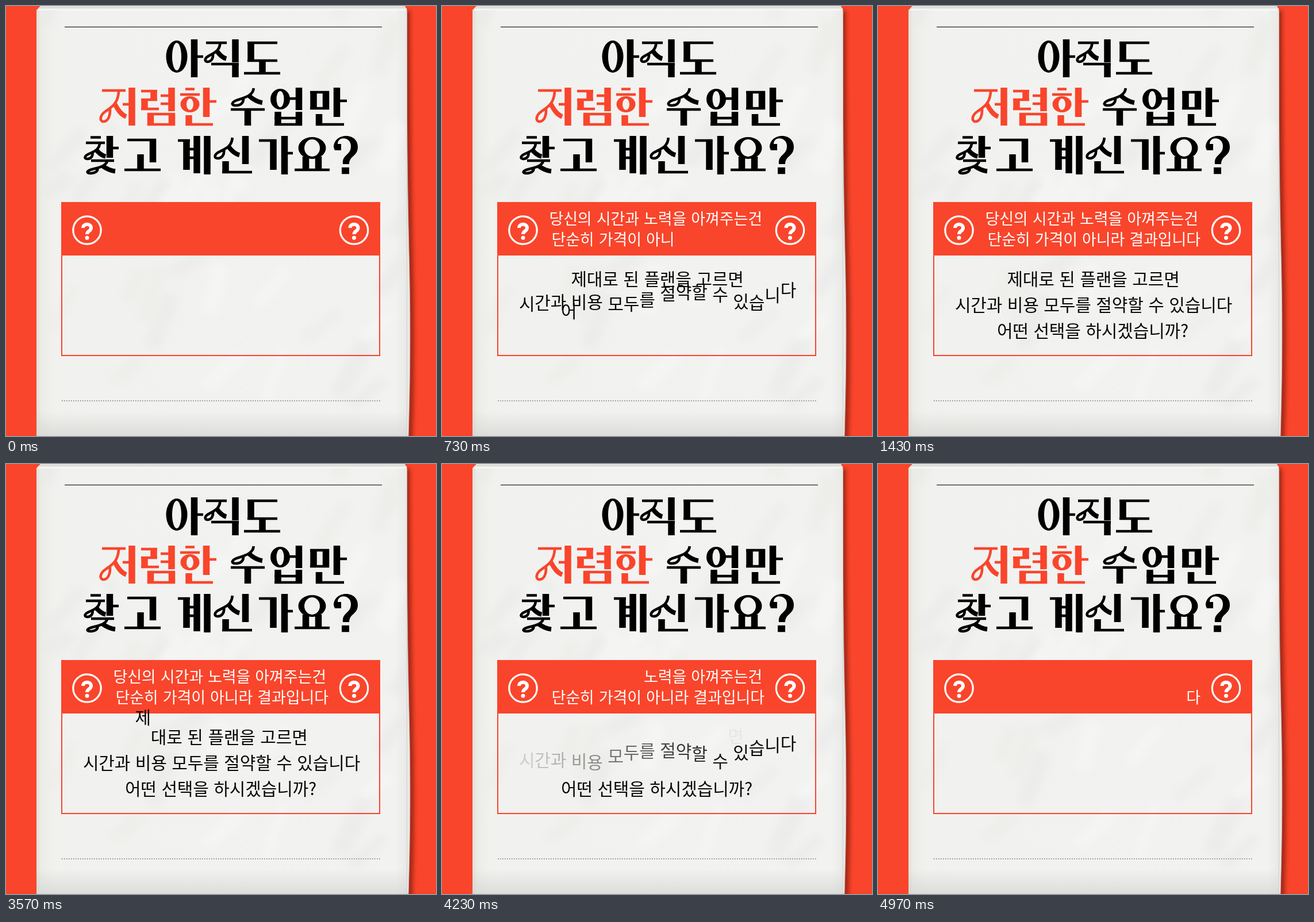
Write an HTML page that moves like this. It is 748 px wide and 748 px high and loops after 5010 ms.

```html
<!DOCTYPE html>
<html lang="ko">
<head>
<meta charset="utf-8">
<style>
html, body { margin: 0; width: 100%; height: 100%; overflow: hidden; background: #f9452b; }
svg { display: block; width: 100vw; height: 100vh; }
text { font-family: "Noto Sans CJK KR", "Noto Sans CJK", "Noto Sans CJK JP", sans-serif; text-anchor: middle; }
.head { font-size: 27px; font-weight: 350; fill: #fff; }
.body { font-size: 30px; font-weight: 500; fill: #080808; }
.thin { fill: none; stroke-width: 4.6; }
.thick { fill: none; stroke-width: 11.5; }
</style>
</head>
<body>
<svg id="stage" viewBox="0 0 748 748">
  <defs>
    <linearGradient id="sheet">
      <stop offset="0" stop-color="#dfdfd8"/>
      <stop offset=".012" stop-color="#ecece7"/>
      <stop offset=".05" stop-color="#f1f1ef"/>
      <stop offset=".97" stop-color="#f2f2f1"/>
      <stop offset="1" stop-color="#e9e9e7"/>
    </linearGradient>
    <linearGradient id="foot" x2="0" y2="1">
      <stop offset="0" stop-color="#cfcfcc" stop-opacity="0"/>
      <stop offset="1" stop-color="#cfcfcc" stop-opacity=".6"/>
    </linearGradient>
    <filter id="soft" x="-50%" y="-50%" width="200%" height="200%"><feGaussianBlur stdDeviation="7"/></filter>
    <filter id="blur" x="-200%" width="500%"><feGaussianBlur stdDeviation="3.5"/></filter>
    <clipPath id="page"><path d="M53 7H697V748H53Z"/></clipPath>
  </defs>
  <rect width="748" height="748" fill="#f9452b"/>
  <path d="M698 8C699 200 700 300 703 430C706 550 706 650 702 760" fill="none" stroke="#7a1c10" stroke-width="9" opacity=".75" filter="url(#blur)"/>
  <path d="M690 4H697C697 200 698 300 701 430C704 550 703 650 700 748H690Z" fill="#e9e9e6" stroke="#c9c5c0" stroke-width=".8"/>
  <path d="M53 7L60 0H694L697 7Z" fill="#e6e6e2"/>
  <path d="M53 7H697V748H53Z" fill="url(#sheet)"/>
  <path d="M56 6.5H696" stroke="#fbfbf9" stroke-width="2"/>
  <path d="M60 2.5H694" stroke="#d2d2cd" stroke-width="1"/>
  <g id="creases" clip-path="url(#page)" filter="url(#soft)"></g>
  <rect x="53" y="705" width="645" height="43" fill="url(#foot)"/>
  <path d="M697.3 8V748" stroke="#d0d0cc" stroke-width="1"/>
  <path d="M102 36.5H654" stroke="#444" stroke-width="1.4"/>
  <path d="M97 686.8H651" stroke="#777" stroke-width="1.4" stroke-dasharray="1.6 2.4"/>
  <g id="title" role="img" aria-label="아직도 저렴한 수업만 찾고 계신가요?"></g>
  <rect x="97" y="342" width="553" height="266" fill="none" stroke="#f9452b" stroke-width="2"/>
  <rect x="96" y="341" width="555" height="93" fill="#f9452b"/>
  <g id="badges"></g>
  <g id="copy"></g>
</svg>
<script>
const $ = id => document.getElementById(id);
function add(parent, tag, attrs) {
  const el = document.createElementNS("http://www.w3.org/2000/svg", tag);
  for (const k in attrs) el.setAttribute(k, attrs[k]);
  return parent.appendChild(el);
}

// Paper creases
let seed = 11;
const rnd = () => (seed = seed * 16807 % 2147483647) / 2147483647;
for (let i = 0; i < 44; i++) {
  const x = 60 + rnd() * 630, y = 10 + rnd() * 700, lean = 20 + rnd() * 40, drop = 30 + rnd() * 70;
  add($("creases"), "path", {
    d: `M${x} ${y}l${lean} ${-drop}l${14 + rnd() * 20} 10l${-lean} ${drop}z`,
    fill: ["#e8e8e8", "#fafaf9", "#ecece7"][i % 3], opacity: 0.5
  });
}

// Headline lettering: heavy stems, hairline bars, stressed rings, looped legs
const bar = (x, y, y2) => `M${x} ${y}V${y2}`;
const line = (x, x2, y) => `M${x} ${y}H${x2}`;
const oval = (x, y, rx, ry) => `M${x - rx} ${y}a${rx} ${ry} 0 1 0 ${2 * rx} 0a${rx} ${ry} 0 1 0 ${-2 * rx} 0Z`;
const ring = (x, y, rx, ry) => oval(x, y, rx, ry) + oval(x, y, rx - 10.5, ry - 4);
function plot(d, x, y, w, h) {
  let n = 0;
  return d.replace(/-?\d*\.?\d+/g, v => (n++ % 2 ? y + v * h : x + v * w).toFixed(1));
}
const loop = (...box) => plot("M.7 0C.68 .4 .46 .52 .22 .66C-.04 .8 -.03 1 .12 1C.3 1 .4 .8 .36 .55", ...box);
const leg = (...box) => plot("M.54 .42C.66 .62 .78 .78 .98 .84", ...box);

function letter(color, { thin, thick, legs, rings }) {
  const g = add($("title"), "g", { stroke: color, fill: color });
  add(g, "path", { class: "thin", d: thin.join("") });
  add(g, "path", { class: "thick", d: thick.join("") });
  add(g, "path", { d: legs.join(""), fill: "none", "stroke-width": 8 });
  add(g, "path", { d: rings.join(""), stroke: "none", "fill-rule": "evenodd" });
}

const jik = [346, 64, 38, 33], su = [393, 143, 54, 30], chat = [137, 239, 37, 27], jat = [141, 269, 50, 22], sin = [363, 229, 44, 36];
// 아직도
letter("#000", {
  thin: [line(333, 343, 88), line(348, 384, 64), loop(...jik), line(357, 405, 101),
    line(420, 472, 64), line(420, 472, 95), line(414, 477, 117)],
  thick: [bar(327.5, 58, 124), bar(399, 58, 98), bar(399, 99, 124), bar(426, 62, 97), bar(446, 95, 117)],
  legs: [leg(...jik)],
  rings: [ring(297, 88, 18.5, 28)]
});
// 저렴한
const jeo = [164, 147, 46, 54];
letter("#f9452b", {
  thin: [line(167, 208, 147), loop(...jeo), line(203, 216, 171),
    line(235, 263, 148), line(235, 263, 163), line(235, 266, 179), line(269, 284, 156), line(269, 284, 170),
    line(246, 294, 188), line(246, 294, 206),
    line(312, 328, 144.5), line(303, 337, 154), line(354, 366, 166), line(313, 360, 206)],
  thick: [bar(219, 142, 208), bar(257, 146, 165), bar(241, 161, 181), bar(288, 142, 183),
    bar(251.5, 186, 208), bar(288.5, 186, 208), bar(348.5, 142, 193), bar(318, 190, 208)],
  legs: [leg(...jeo)],
  rings: [ring(320, 171, 16.5, 14)]
});
// 수업만
letter("#000", {
  thin: [loop(...su), line(391, 450, 180),
    line(490, 504, 161), line(467, 515, 195), line(467, 515, 206),
    line(529, 562, 150), line(529, 562, 178), line(581, 593, 165), line(539, 588, 206)],
  thick: [bar(420.5, 180, 208), bar(509.5, 142, 181), bar(473, 184, 208), bar(509.5, 184, 208),
    bar(535, 148, 180), bar(556.5, 148, 180), bar(575.5, 142, 193), bar(544.5, 188, 208)],
  legs: [leg(...su)],
  rings: [ring(477, 162, 17, 18)]
});
// 찾고 계신가요?
letter("#000", {
  thin: [line(147, 165, 228.5), line(139, 172, 238), loop(...chat), line(186, 196, 247),
    line(148, 188, 269), loop(...jat),
    line(211, 261, 233), line(206, 269, 285),
    line(299, 320, 234), line(318, 330, 249), line(318, 330, 264),
    loop(...sin), line(376, 428, 289),
    line(440, 470, 234), line(490, 499, 256), line(502, 563, 285)],
  thick: [bar(180.5, 226, 264), bar(255.5, 231, 272), bar(234, 258, 285),
    bar(314, 232, 285), bar(332, 226, 291), bar(350, 226, 293),
    bar(416.5, 226, 275), bar(382, 270, 291), bar(465, 232, 285), bar(484.5, 226, 293),
    bar(521.5, 262, 285), bar(543.5, 262, 285), "M584 286.5H597"],
  legs: [leg(...chat), leg(...jat), leg(...sin)],
  rings: [ring(532.5, 247, 24, 19),
    "M570 246C570 220 612 219 612 245C612 262 597 260 597 275H586C584 258 600 260 600 244C600 227 577 226 577 240H583V251H572Z"]
});

for (const x of [141, 605.5]) {
  const g = add($("badges"), "g", { transform: `translate(${x} 390)`, fill: "none", stroke: "#fff" });
  add(g, "circle", { r: 24.2, "stroke-width": 3.2 });
  add(g, "path", { d: "M-7 -4C-7 -12.5 7 -12.5 7 -4C7 2 0 1 0 7", "stroke-width": 6 });
  add(g, "circle", { cy: 13.2, r: 3.5, fill: "#fff", stroke: "none" });
}

// Animated copy: one element per syllable; spaces and line breaks also take a turn
function setLines(cls, lines, pitch, space) {
  const list = [];
  let turn = 0;
  for (const [str, left, y] of lines) {
    let x = left;
    for (const ch of str) {
      const step = ch === " " ? space : ch === "?" ? pitch / 2 : pitch;
      if (ch !== " ") {
        const el = add($("copy"), "text", { class: cls, x: x + step / 2, y });
        el.textContent = ch;
        list.push({ el, y, turn });
      }
      x += step;
      turn++;
    }
    turn++;
  }
  return list;
}
const head = setLines("head", [
  ["당신의 시간과 노력을 아껴주는건", 186.5, 380],
  ["단순히 가격이 아니라 결과입니다", 190.5, 416]
], 24.7, 8.2);
const body = setLines("body", [
  ["제대로 된 플랜을 고르면", 224.5, 486],
  ["시간과 비용 모두를 절약할 수 있습니다", 134, 531],
  ["어떤 선택을 하시겠습니까?", 207, 576]
], 27.45, 8.6);

const LOOP = 5010, FRAME = 1000 / 30;
const TYPE = { start: 0, gap: 26.05 }, ERASE = { start: 3998, gap: 28 };
const IN = { start: 38, gap: 19.3, span: 446, land: 0.185, rest: 0.615 };
const OUT = { start: 3566, gap: 19.3, span: 452, land: 0.225, rest: 0.65 };
const arc = (p, a, b) => 1 - ((2 * p - a - b) / (b - a)) ** 2;

// Drop from above, then two bounces
function lift(p, { land, rest }) {
  if (p >= 1) return 0;
  if (p < land) return 34 * (1 - (p / land) ** 2);
  if (p < rest) return 22.5 * arc(p, land, rest);
  return 5.5 * arc(p, rest, 1);
}
const phase = (t, turn, m) => (t - m.start - turn * m.gap) / m.span;
const count = (t, m) => Math.floor((t - m.start) / m.gap);

function draw(ms) {
  const t = Math.min(149, Math.floor((ms % LOOP + 3.4) / FRAME)) * FRAME;
  const typed = count(t, TYPE), erased = count(t, ERASE);
  for (const { el, turn } of head) el.setAttribute("opacity", turn < typed && turn >= erased ? 1 : 0);
  for (const { el, y, turn } of body) {
    const p = phase(t, turn, IN), q = phase(t, turn, OUT);
    const up = q >= 0 ? lift(q, OUT) : p >= 0 ? lift(p, IN) : 0;
    const alpha = p < 0 ? 0 : q < 0 ? 1 : Math.max(0, Math.min(1, 1.25 * (1 - q)));
    el.setAttribute("y", (y - up).toFixed(2));
    el.setAttribute("opacity", alpha.toFixed(3));
  }
}

const begin = performance.now();
function tick() {
  draw(performance.now() - begin);
  requestAnimationFrame(tick);
}
tick();
</script>
</body>
</html>
```
